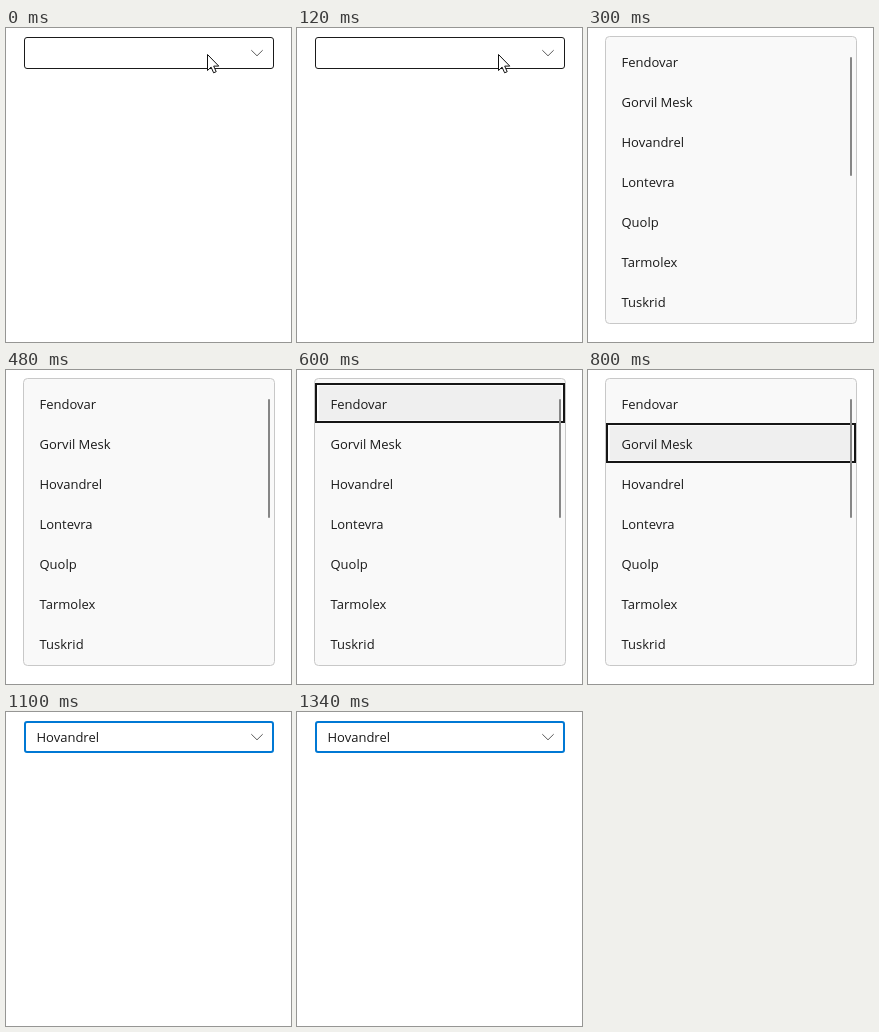
Recreate the animation shown at these times as an HTML page. Size 285x314 px, loop 1.5 s.

```html
<!DOCTYPE html>
<html lang="en">
<head>
<meta charset="utf-8">
<title>Combo box</title>
<style>
  html, body { margin: 0; width: 100%; height: 100%; overflow: hidden; background: #fff; }
  svg { display: block; width: 285px; height: 314px; }
  text { font: 13px "Open Sans", "Noto Sans", sans-serif; fill: #1a1a1a; }
  .field { fill: #fff; stroke: #1a1a1a; }
  .field.active { stroke: #0078d4; stroke-width: 2; }
  .chevron { fill: none; stroke: #5c5c5c; }
  .panel { fill: #f9f9f9; stroke: #c8c8c8; }
  .ring { fill: none; stroke: #161616; stroke-width: 2; }
  .gap { fill: none; stroke: #fff; stroke-opacity: .7; }
  .thumb { fill: #868686; }
  .cursor { fill: #fff; stroke: #111; }
</style>
</head>
<body>
<svg viewBox="0 0 285 314">
  <g id="closed">
    <rect id="idle" class="field" x="18.5" y="9.5" width="249" height="31" rx="2.5"/>
    <rect id="active" class="field active" x="19" y="10" width="248" height="30" rx="2"/>
    <path class="chevron" d="M245.3 22.2L251 27.8l5.7-5.6"/>
    <text id="value" x="30.5" y="30"></text>
  </g>
  <g id="open">
    <rect class="panel" x="17.5" y="8.5" width="251" height="287" rx="4"/>
    <g id="row">
      <rect fill="#efefef" x="22" y="15" width="242" height="36" rx="2"/>
      <g id="focus">
        <rect class="gap" x="20.5" y="15.5" width="245" height="35"/>
        <rect class="ring" x="19" y="14" width="248" height="38"/>
      </g>
    </g>
    <g id="items"></g>
    <rect class="thumb" x="262" y="29" width="2" height="119" rx="1"/>
  </g>
  <path id="cursor" class="cursor" d="M.5 .5v16l3.6-3.4 2.5 5.7 2.6-1.1-2.5-5.6h5.1z"/>
</svg>
<script>
const LOOP = 1500, ROW = 40;
const names = ["Fendovar", "Gorvil Mesk", "Hovandrel", "Lontevra", "Quolp", "Tarmolex", "Tuskrid"];

const steps = [
  { at: 0, cursor: 201 },
  { at: 200, open: true, row: 0, cursor: 200 },
  { at: 300, open: true },
  { at: 600, open: true, row: 0, focus: true },
  { at: 800, open: true, row: 1, focus: true },
  { at: 900, open: true, row: 2, focus: true },
  { at: 1100, value: names[2] }
];

const $ = id => document.getElementById(id);
const show = (id, on) => $(id).setAttribute("visibility", on ? "visible" : "hidden");
const move = (id, x, y) => $(id).setAttribute("transform", `translate(${x} ${y})`);

names.forEach((name, i) => {
  const label = document.createElementNS("http://www.w3.org/2000/svg", "text");
  label.setAttribute("x", 33.5);
  label.setAttribute("y", 39 + ROW * i);
  label.textContent = name;
  $("items").append(label);
});

function draw({ open, row = -1, focus, cursor, value = "" }) {
  $("closed").style.display = open ? "none" : "";
  $("open").style.display = open ? "" : "none";
  show("idle", !value);
  show("active", value);
  $("value").textContent = value;
  show("row", row >= 0);
  show("focus", focus);
  move("row", 0, ROW * Math.max(row, 0));
  show("cursor", cursor);
  move("cursor", cursor || 0, 26);
}

const start = performance.now();
let current;

function tick(now) {
  const t = Math.max(0, now - start) % LOOP;
  const step = steps.findLast(s => s.at <= t);
  if (step !== current) draw(current = step);
  requestAnimationFrame(tick);
}
tick(start);
</script>
</body>
</html>
```
